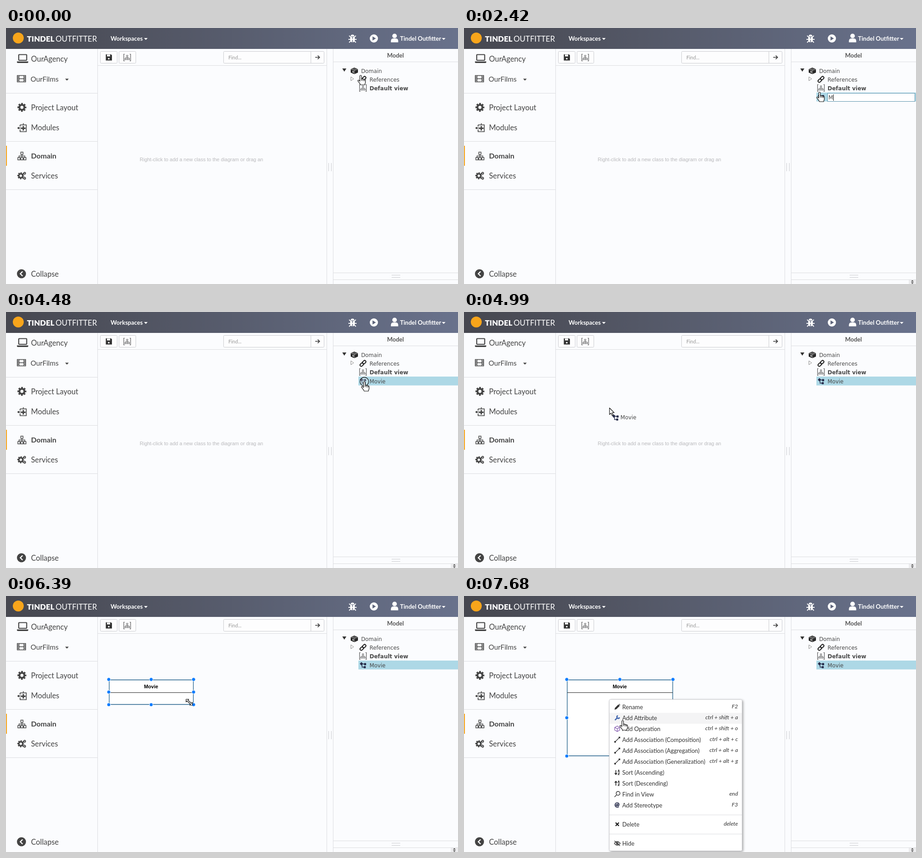
Animation of 994 by 563 pixels, one loop 8000 ms. Source, as an HTML page:

```html
<!DOCTYPE html>
<html lang="en">
<head>
<meta charset="utf-8">
<title>Domain designer</title>
<style>
html, body { margin: 0; width: 100%; height: 100%; overflow: hidden; background: #fbfcfe; }
svg { display: block; width: 994px; height: 563px; }
text { font-family: Lato, sans-serif; font-size: 13px; fill: #333; white-space: pre; }
.nav text { font-size: 16.4px; fill: #444; }
.bar text { fill: #fff; font-weight: 700; }
.bar .brand { font-size: 17px; }
.tree text, .tree-text { font: 11.8px "DejaVu Sans", sans-serif; fill: #484848; }
.box text { font: bold 11px "Liberation Sans", Arial, sans-serif; fill: #000; text-anchor: middle; }
.menu text { font-size: 12.9px; }
.menu .key { font-size: 12.4px; font-style: italic; text-anchor: end; }
.line { fill: none; stroke: #dcdde0; }
.btn { fill: #fdfdfe; stroke: #cbccd0; }
</style>
</head>
<body>
<svg viewBox="0 0 994 563">
<defs>
  <linearGradient id="head">
    <stop offset="0" stop-color="#46474f"/><stop offset="1" stop-color="#69728c"/>
  </linearGradient>
  <filter id="shade" x="-10%" y="-10%" width="120%" height="120%">
    <feDropShadow dx="2" dy="2" stdDeviation="2.5" flood-opacity=".35"/>
  </filter>
  <path id="caret" d="M-4-2H4L0 2.2Z"/>
  <g id="gear" fill="none" stroke="#444">
    <circle r="5.5" stroke-width="4.2"/>
    <circle r="8" stroke-width="3.6" stroke-dasharray="3.6 2.683" stroke-dashoffset="1.8"/>
  </g>
  <path id="tree3" d="M-2.5-8h5v5h-5ZM-9 4h5v5h-5ZM-2.5 4h5v5h-5ZM4 4h5v5h-5ZM0-3V4M-6.5 4V.5H6.5V4" fill="none" stroke="#444" stroke-width="1.4"/>
  <g id="diagram" fill="none" stroke="#555">
    <path d="M-5.5-7.5h-2v15h2M5.5-7.5h2v15h-2" stroke-width="1.2"/>
    <path d="M-1.5-5h3v3h-3ZM-5.2 2.5h2v2.500h-2ZM-1 2.500h2v2.500h-2ZM3.200 2.500h2v2.500h-2ZM0-2V2.500M-4.200 2.500V.5H4.200V2.500" stroke-width=".9"/>
  </g>
  <g id="class" fill="#272c4a">
    <path d="M-7-3-3.5-6.8 .5-3-3.2 1Z"/><path d="M-.5-2.5H3M-2-.5V4.5H2" fill="none" stroke="#272c4a" stroke-width="1.4"/>
    <rect x="2.4" y="-4.4" width="4.6" height="4.6" rx=".8"/><rect x="1.6" y="2.2" width="4.6" height="4.6" rx=".8"/>
  </g>
  <g id="pack">
    <path d="M-8-3.5 0-7 8-3.5V4L0 7.5-8 4Z" fill="#282828"/><path d="M-6-3.5 0-6 6-3.5 0-1Z" fill="#5a5a5a"/>
    <path d="M-8-3.5 0-.5 8-3.5M0-.5V7" fill="none" stroke="#aaa"/><path d="M-4 .5-1.5 1.5V4.5L-4 3.4Z" fill="#ddd"/>
  </g>
  <g id="link" fill="none" stroke="#222" stroke-width="2" transform="rotate(-45)">
    <rect x="-8" y="-2.8" width="8.4" height="5.6" rx="2.8"/><rect x="-.4" y="-2.8" width="8.4" height="5.6" rx="2.8"/>
  </g>
  <path id="pencil" d="M-6 6-5 2 2.5-5.5 5.5-2.5-2 5ZM3.3-6.2Q4.5-7.2 5.6-6T6.3-3.3Z" fill="#333"/>
  <g id="type" fill="#c9cce0" stroke="#4b517c"><rect x="-1" y="-4.5" width="6" height="8"/><rect x="-5" y="0" width="4.6" height="4.6"/><path d="M1-2.5H3M1-.5H3M1 1.5H3"/></g>
  <g id="enum" fill="#fff" stroke="#e2532c" stroke-width="1.3"><rect x="-1" y="-5" width="7" height="6"/><rect x="-6" y="-.5" width="7" height="6"/><path d="M-4 1.5H-1M-4 3.5H-1M1.5-3H4"/></g>
  <g id="comment"><path d="M-2-5H7V3H5V5L3 3H-2Z" fill="#e88912"/><path d="M-7-3.5H4V3H-2L-5 6V3H-7Z" fill="#f8a51b"/></g>
  <g id="stereo" fill="none" stroke="#272c4a" stroke-width="1.4"><rect x="-4.5" y="-4.5" width="9" height="10.5" rx="1"/><path d="M-2-5.5H2"/><circle cy="1" r="2.3"/></g>
  <path id="folder" d="M-6.5-5H-1L.5-3.5H6.5V5H-6.5Z" fill="#f8a51b"/>
  <text id="at" x="-6" y="4" style="font-weight:900;font-size:13px;fill:#272c4a;stroke:#272c4a;stroke-width:.4">@</text>
  <path id="cross" d="M-3.6-3.6 3.6 3.6M3.6-3.6-3.6 3.6" stroke="#222" stroke-width="2.4"/>
  <path id="wrench" d="M-5 5 1-1M1.5-4.8A3 3 0 1 0 5-1" fill="none" stroke="#4468b0" stroke-width="2.6"/>
  <path id="cube" d="M0-6 5.5-3V3L0 6-5.5 3V-3ZM-5.5-3 0 0 5.5-3M0 0V6" fill="none" stroke="#7a4fa8" stroke-width="1.2"/>
  <g id="assoc"><path d="M-4 4 4-4" stroke="#333" stroke-width="1.2"/><path d="M-6.5 3h3.5v3.5h-3.5ZM3-6.5h3.5v3.5h-3.5Z" fill="#333"/></g>
  <path id="az" d="M1.5-1 3.3-5.5 5-1M2-2.5H4.6M1.8 1.2H4.8L1.8 4.8H5" fill="none" stroke="#222" stroke-width="1.2"/>
  <g id="sort"><path d="M-3-5V4M-5.6 1.6-3 4.6-.4 1.6" fill="none" stroke="#222" stroke-width="1.6"/><use href="#az"/></g>
  <g id="sortup"><path d="M-3 5V-4M-5.6-1.6-3-4.6-.4-1.6" fill="none" stroke="#222" stroke-width="1.6"/><use href="#az"/></g>
  <path id="find" d="M-6 6-1.6 1.4M6-2a4.2 4.2 0 1 1-8.4 0 4.2 4.2 0 1 1 8.4 0" fill="none" stroke="#333" stroke-width="1.4"/>
  <path id="hide" d="M-6.5 0Q0-8 6.5 0 0 8-6.5 0M-6-5.5 6 5.5M2 0a2 2 0 1 1-4 0 2 2 0 1 1 4 0" fill="none" stroke="#333" stroke-width="1.4"/>
</defs>

<rect width="994" height="563" fill="#fbfcfe"/>

<g class="bar">
  <rect width="994" height="46" fill="url(#head)"/>
  <circle cx="27" cy="22" r="12" fill="#f8a51b"/>
  <text class="brand" x="46" y="29.5" style="font-weight:900">TINDEL</text>
  <text class="brand" x="109" y="29.5" style="font-weight:400">OUTFITTER</text>
  <text x="230" y="28">Workspaces</text><use href="#caret" x="307.5" y="24" fill="#fff"/>
  <g transform="translate(762 23)" stroke="#fff" fill="#fff">
    <path d="M-4-4.5a4 4 0 0 1 8 0Z" stroke="none"/><path d="M-5-3.5H-.7V8.5Q-5 8-5 3ZM5-3.5H.7V8.5Q5 8 5 3Z" stroke="none"/>
    <path d="M-9 2H9M-7.5-6-4-3M7.5-6 4-3M-7.5 9-4 5.5M7.5 9 4 5.5" stroke-width="1.8"/>
  </g>
  <circle cx="809" cy="23" r="9" fill="#fff"/><path d="M806 18.5V27.5L813.5 23Z" fill="#5f667c"/>
  <circle cx="854.5" cy="17.5" r="5" fill="#fff"/><path d="M846.5 31.5V28Q847 23.5 851 23H858Q862 23.5 862.5 28V31.5Z" fill="#fff"/>
  <text x="866.5" y="28">Tindel Outfitter</text><use href="#caret" x="962.5" y="24" fill="#fff"/>
</g>

<g class="nav">
  <path class="line" d="M201.5 46V563M0 143.5H201M0 249.5H201M0 355.5H201"/>
  <rect y="259" width="2" height="44" fill="#f8a51b"/>
  <rect x="28" y="58.5" width="17.5" height="12.5" rx="1" fill="none" stroke="#444" stroke-width="2.2"/>
  <path d="M24 73.5H49V75Q49 77 47 77H26Q24 77 24 75Z" fill="#444"/>
  <path d="M24.8 104.5H43.2V118.5H24.8ZM28.5 104V119M39.5 104V119M28.5 111.5H39.5M25 108H28M25 111.5H28M25 115H28M40 108H43M40 111.5H43M40 115H43" fill="none" stroke="#444" stroke-width="1.6"/>
  <use href="#gear" x="35" y="174.5"/>
  <path d="M31 213H44.5V228H31V223M31 213V217M38 209.5V213M27 220H33" fill="none" stroke="#444" stroke-width="1.7"/>
  <path d="M38 215.5V225.5M33 220.5H43" stroke="#444" stroke-width="3"/><circle cx="27.5" cy="220" r="2.2" fill="#444"/>
  <use href="#tree3" x="35" y="281"/>
  <use href="#gear" transform="translate(32.5 325) scale(.78)"/>
  <g fill="none" stroke="#444" stroke-width="1.8"><circle cx="41" cy="319.5" r="2"/><circle cx="41" cy="330.5" r="2"/></g>
  <circle cx="34" cy="540.5" r="10" fill="#444"/><path d="M36.5 535.5 31.5 540.5 36.5 545.5" fill="none" stroke="#fff" stroke-width="2.4"/>
  <text x="55" y="74">OurAgency</text>
  <text x="54" y="117.5" style="font-size:15.4px">OurFilms</text><use href="#caret" x="134" y="113.5" fill="#444"/>
  <text x="55" y="180.5">Project Layout</text>
  <text x="55" y="225">Modules</text>
  <text x="55" y="287" style="font-size:16px;font-weight:700">Domain</text>
  <text x="55" y="331">Services</text>
  <text x="55" y="547">Collapse</text>
</g>

<path class="line" d="M202 82.5H705M705.5 46V563M719.5 46V563M720 74.5H994M720 538.5H994M720 553.5H994"/>
<path d="M709.5 297V315M715.5 297V315M848 543.5H867M848 548.5H867" stroke="#c9cace"/>
<rect class="btn" x="207.5" y="51.5" width="37" height="26" rx="2"/>
<rect class="btn" x="248.5" y="51.5" width="37" height="26" rx="2"/>
<path d="M219.5 58H231L233 60V71.5H219.5Z" fill="#333"/><path d="M222 58.5H229V62.5H222Z" fill="#fff"/><circle cx="226" cy="67.5" r="1.8" fill="#fff"/>
<use href="#diagram" x="266.5" y="65"/>
<rect class="btn" x="478.5" y="51.5" width="221" height="26" rx="2"/><path d="M670.5 52V77" stroke="#cbccd0"/>
<text x="489" y="69" style="font-size:11px;fill:#999">Find...</text>
<path d="M680 64.5H689M685.5 60.5 689.5 64.5 685.5 68.5" fill="none" stroke="#333" stroke-width="1.7"/>
<text x="856.5" y="64.5" text-anchor="middle" style="font-weight:700;fill:#555">Model</text>
<text id="hint" x="294" y="292.5" style="font:11px 'Liberation Sans',Arial,sans-serif;fill:#b9b9bc">Right-click to add a new class to the diagram or drag an</text>

<g class="tree">
  <rect id="pick" x="757" y="84" width="237" height="19" fill="#add8e6"/>
  <path d="M739.5 89H748.5L744 96Z" fill="#333"/><path d="M758.5 107.5V116L764.5 111.8Z" fill="#fff" stroke="#888"/>
  <use href="#pack" x="766" y="94"/><text x="781" y="98.5">Domain</text>
  <use href="#link" x="785" y="113"/><text x="799.5" y="118">References</text>
  <use href="#diagram" x="785" y="132"/><text x="799.5" y="137" style="font-size:12px;font-weight:700">Default view</text>
  <g id="node">
    <rect x="775" y="142" width="219" height="19.5" fill="#add8e6"/>
    <use href="#class" x="785" y="152"/>
    <g id="field">
      <rect x="799.5" y="143.5" width="192" height="18" fill="#fff" stroke="#5a92ac"/>
      <rect id="mark" x="801" y="145" width="57" height="15" fill="#0078d7"/>
    </g>
    <text id="label" y="157"></text>
    <path id="beam" d="M0 146V160" stroke="#111"/>
  </g>
</g>
<g id="foot">
  <text x="820" y="571" style="font-size:12px;fill:#777">Comment</text>
  <rect x="978" y="554" width="16" height="9" fill="#ececee"/><path d="M983 557.5 986 554.5 989 557.5ZM983 559.5 986 562.5 989 559.5Z" fill="#444"/>
</g>

<g id="box" class="box">
  <rect id="frame" x="227" y="184.5" rx="4" fill="#fff" stroke-width="1.3"/>
  <path id="split" stroke="#222" stroke-width="1.2"/>
  <text id="title" y="203">Movie</text>
  <g id="grips"></g>
</g>
<g id="menus"></g>
<g id="ghost"><use href="#class" x="13" y="21"/><text class="tree-text" x="24" y="25">Movie</text></g>
<circle id="ring" r="9.5" fill="#fff" fill-opacity=".25" stroke="#222" stroke-width="1.3"/>
<g id="cursor" fill="#fff" stroke="#111" stroke-width="1.2" stroke-linejoin="round">
  <path id="hand" d="M-1.8 13V1.8a1.8 1.8 0 0 1 3.6 0V8.2c1-.9 3-.6 3.3.6 1-.7 2.8-.4 3 .9 1-.6 2.4-.1 2.4 1.4V15c0 2-1.5 3.5-1.5 6H-.5C-1 18.5-3.5 16-6 12.8c-1-1.4.6-3 2.2-1.8ZM1.8 8V12M5.1 9V12.5M8.1 10V13"/>
  <path id="arrow" d="M0 0V14.5L3.3 11.4 5.6 16.6 8 15.6 5.7 10.5H10.3Z"/>
  <path id="size" d="M-8-7H-2L-4-5 4 2 6 0V6H0L2 4-6-3-8-1Z"/>
</g>
</svg>
<script>
const $ = id => document.getElementById(id);
const show = (id, on) => { $(id).style.display = on ? '' : 'none'; };
const put = (id, a) => { for (const k in a) $(id).setAttribute(k, a[k]); };
const move = (id, x, y) => put(id, { transform: `translate(${x} ${y})` });

// Items are "icon|label|shortcut"; an empty item is a divider.
function addMenu(id, x, y, w, h, items) {
  let cy = y + 17, out = '';
  for (const item of items) {
    if (!item) {
      out += `<path class="line" d="M${x + 1} ${cy - 2.5}H${x + w}"/>`;
      cy += 18;
      continue;
    }
    const [icon, label, key = ''] = item.split('|');
    out += `<use href="#${icon}" x="${x + 18}" y="${cy}"/><text x="${x + 29}" y="${cy + 5}">${label}</text>` +
      `<text class="key" x="${x + w - 8.5}" y="${cy + 3}">${key}</text>`;
    cy += 24;
  }
  $('menus').innerHTML += `<g id="${id}" class="menu">
    <rect x="${x + .5}" y="${y + .5}" width="${w}" height="${h}" rx="3" fill="#fff" stroke="#c8c8cc" filter="url(#shade)"/>
    <rect id="${id}Hover" x="${x + 1}" width="${w - 1}" height="24" fill="#f4f4f5"/>${out}</g>`;
}

addMenu('treeMenu', 721, 100, 267, 267, [
  'pencil|Rename|F2', 'class|New Class|ctrl + shift + c', 'type|New Type|ctrl + shift + t',
  'enum|New Enum|ctrl + shift + e', 'comment|New Comment|ctrl + shift + o',
  'diagram|New Diagram|ctrl + shift + v', 'stereo|New Stereotype Definition|ctrl + shift + s',
  'folder|New Folder|ctrl + shift + b', 'at|Add Stereotype|F3', '', 'cross|Unload Package|delete']);
addMenu('boxMenu', 319, 227, 292, 333, [
  'pencil|Rename|F2', 'wrench|Add Attribute|ctrl + shift + a', 'cube|Add Operation|ctrl + shift + o',
  'assoc|Add Association (Composition)|ctrl + alt + c', 'assoc|Add Association (Aggregation)|ctrl + alt + a',
  'assoc|Add Association (Generalization)|ctrl + alt + g', 'sort|Sort (Ascending)', 'sortup|Sort (Descending)',
  'find|Find in View|end', 'at|Add Stereotype|F3', '', 'cross|Delete|delete', '', 'hide|Hide']);

// The screen refreshes only at these moments: [first, last, count].
const ticks = [0];
for (const [a, b, n] of [[120, 700, 5], [980, 1430, 4], [2420, 2420, 1], [2680, 3100, 4], [3500, 3500, 1],
  [4060, 4990, 8], [5140, 6110, 8], [6260, 7250, 8], [7370, 7680, 3]])
  for (let i = 0; i < n; i++) ticks.push(Math.round(a + (b - a) * i / Math.max(1, n - 1)));
const snap = t => ticks.filter(k => k <= t).pop();

// Pointer path: [time, x, y]
const path = [
  [0, 780, 104], [120, 777, 100], [265, 775, 100], [555, 775, 100], [700, 778, 116], [980, 782, 136],
  [1280, 783, 141], [1430, 782, 141], [3500, 782, 141], [4326, 788, 152], [4459, 788, 153], [4591, 730, 158],
  [4724, 600, 170], [4857, 440, 195], [4990, 320, 211], [5140, 320, 213], [5556, 320, 277],
  [5833, 345, 215], [6110, 404, 234], [6260, 404, 234], [6826, 451, 348], [6967, 451, 348],
  [7250, 322, 240], [7370, 320, 237], [7525, 320, 237], [7680, 349, 274]];
function pointer(t) {
  const i = path.findIndex(p => p[0] > t);
  if (i < 0) return path[path.length - 1].slice(1);
  const [a, x, y] = path[i - 1], [b, u, v] = path[i], k = (t - a) / (b - a);
  return [x + (u - x) * k, y + (v - y) * k];
}

function drawBox(s) {
  const k = Math.min(1, Math.max(0, (s - 6260) / 566));
  const w = 185 + 47 * k, h = 54 + 113 * k, picked = s > 5900;
  show('box', s >= 5140);
  put('frame', { width: w, height: h, stroke: picked ? '#1d5d88' : '#222' });
  put('split', { d: `M227 212.5H${227 + w}` });
  put('title', { x: 227 + w / 2 - .5 });
  let out = '';
  if (picked)
    for (const i of [0, .5, 1]) for (const j of [0, .5, 1])
      if (i !== .5 || j !== .5)
        out += `<circle cx="${226 + (w + 1.5) * i}" cy="${183.5 + (h + 1.5) * j}" r="4" fill="#0a7cff" stroke="#fff"/>`;
  $('grips').innerHTML = out;
}

function drawNode(s) {
  const typed = s < 2420 ? 0 : s < 2680 ? 1 : Math.min(5, 2 + Math.round((s - 2680) / 140));
  const fresh = !typed, editing = s < 3500;
  show('node', s >= 1430);
  show('field', editing);
  show('mark', fresh);
  show('beam', editing && !fresh);
  $('label').textContent = fresh ? 'NewClass' : 'Movie'.slice(0, typed);
  put('label', { x: editing ? 801.5 : 799.5 });
  $('label').style.fill = fresh ? '#fff' : '';
  if (s >= 1430 && editing) move('beam', Math.round(801.5 + $('label').getComputedTextLength()) + .5, 0);
}

function draw(t) {
  const s = snap(t), [x, y] = pointer(s);
  show('pick', s >= 410 && s < 1430);
  show('foot', s >= 410);
  show('hint', s < 5140);
  drawNode(s);
  drawBox(s);

  show('treeMenu', s >= 555 && s < 1430);
  show('treeMenuHover', s >= 700);
  put('treeMenuHover', { y: s < 980 ? 105 : 129 });
  show('boxMenu', s >= 7525);
  show('boxMenuHover', s >= 7680);
  put('boxMenuHover', { y: 257 });

  const kind = s < 4591 || s >= 7680 ? 'hand' : s >= 6110 && s < 7100 ? 'size' : 'arrow';
  for (const k of ['hand', 'arrow', 'size']) show(k, k === kind);
  move('cursor', x, y);
  show('ring', [265, 1280, 4459, 5833, 7370].includes(s));
  move('ring', x, y);
  show('ghost', s >= 4591 && s < 5140);
  move('ghost', x, y);
}

const start = performance.now();
function loop() {
  draw((performance.now() - start) % 8000);
  requestAnimationFrame(loop);
}
loop();
</script>
</body>
</html>
```
